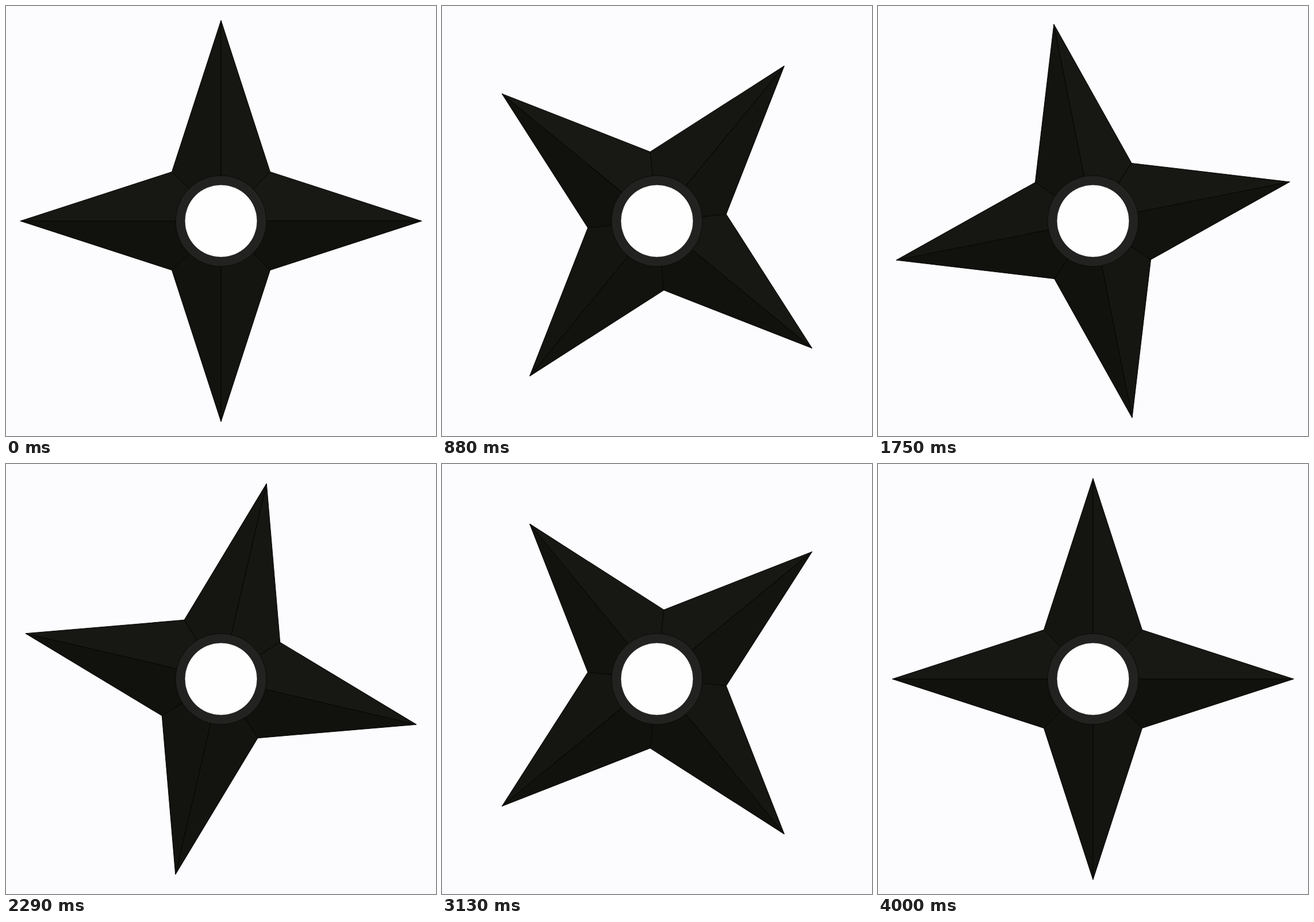
Animation, 748 px wide and 748 px high, one loop 4040 ms. Source, as an HTML page:

```html
<!DOCTYPE html>
<html lang="en">
<head>
<meta charset="utf-8">
<title>Spinning star</title>
<style>
  html, body { margin: 0; width: 100%; height: 100%; overflow: hidden; background: #fcfcff; }
  svg { display: block; width: 100vw; height: 100vh; }
</style>
</head>
<body>
<svg viewBox="-374 -374 748 748">
  <g id="star" stroke="#050604" stroke-width="1" stroke-linejoin="bevel"></g>
  <circle r="79" fill="#222320" stroke="#0a0b08"/>
  <circle r="63" fill="#fefefe" stroke="#141512" stroke-width=".8"/>
</svg>
<script>
const LOOP = 4040;
const FPS = 24;
const STEP = 1.875;      // degrees per drawing
const TIP = 349;
const VALLEY = 85.5;
const LIGHT = -70;       // direction of the light, degrees
const star = document.getElementById('star');
const facets = [];

function addFacet(turn, side) {
  const facet = document.createElementNS('http://www.w3.org/2000/svg', 'polygon');
  facet.setAttribute('points', `0,0 ${TIP},0 ${VALLEY},${side * VALLEY}`);
  facet.setAttribute('transform', `rotate(${turn})`);
  star.append(facet);
  facets.push({ facet, normal: turn + side * 72 });
}

for (let turn = 0; turn < 360; turn += 90) {
  addFacet(turn, -1);
  addFacet(turn, 1);
}

function shade(normal) {
  const light = 3.5 * Math.cos((normal - LIGHT) * Math.PI / 180);
  return `rgb(${[20, 21, 16].map(c => (c + light).toFixed(1))})`;
}

function draw(time) {
  const tick = Math.floor(time / 10) * 10;
  const angle = Math.floor((tick + 4.9) * FPS / 1000) * STEP;
  star.setAttribute('transform', `rotate(${angle})`);
  for (const { facet, normal } of facets) {
    facet.setAttribute('fill', shade(normal + angle));
  }
}

const start = performance.now();
function loop() {
  draw((performance.now() - start) % LOOP);
  requestAnimationFrame(loop);
}
draw(0);
requestAnimationFrame(loop);
</script>
</body>
</html>
```
